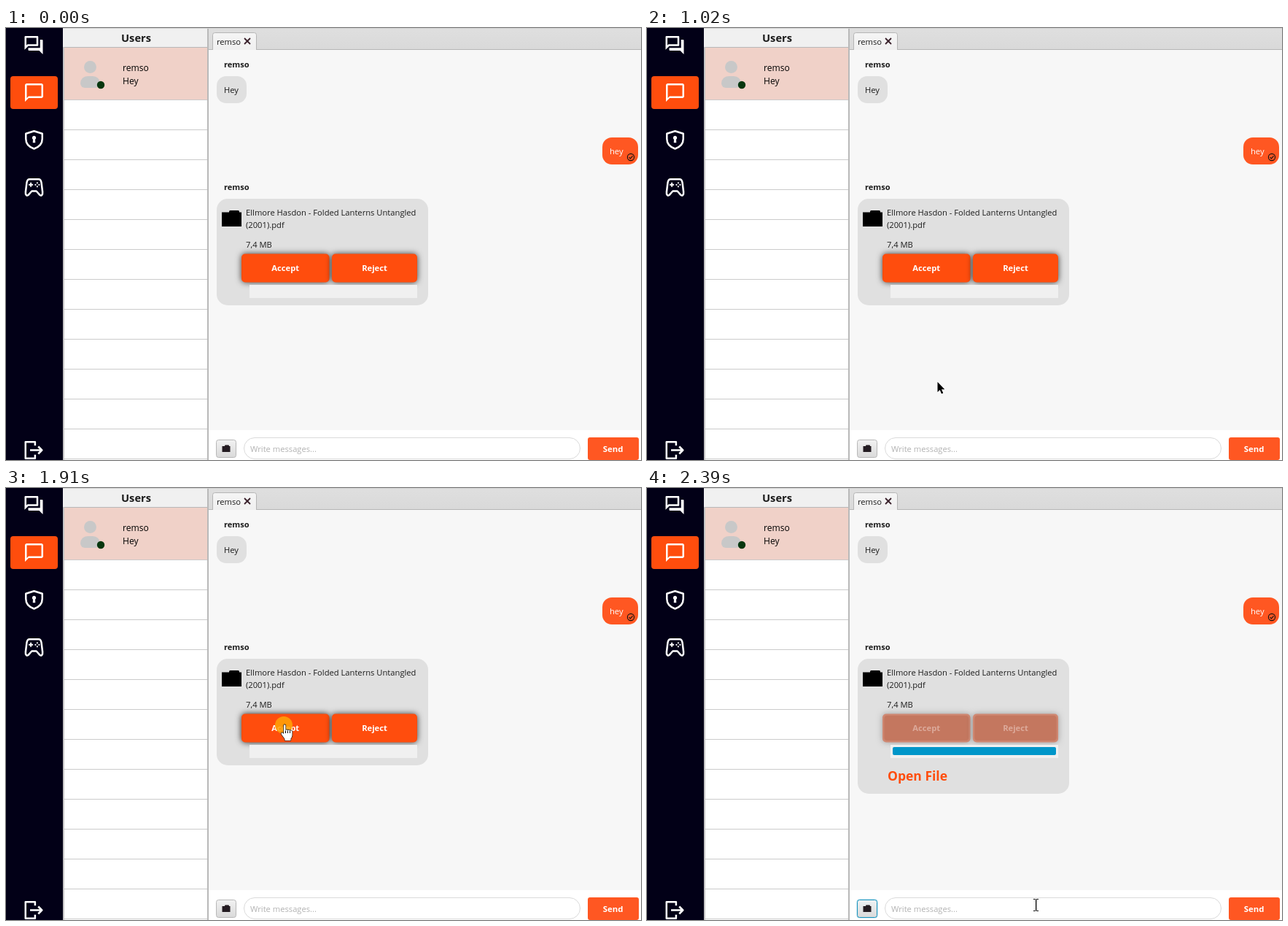
An HTML page with a canvas that plays this animation: 871x592 px, repeating every 2460 ms.

```html
<!DOCTYPE html>
<html lang="en">
<head>
<meta charset="utf-8">
<title>Chat file transfer</title>
<style>
html, body { margin: 0; width: 100%; height: 100%; overflow: hidden; background: #f7f7f7; }
canvas { display: block; width: 871px; height: 592px; }
</style>
</head>
<body>
<canvas id="stage" width="871" height="592"></canvas>
<script>
const ctx = document.getElementById('stage').getContext('2d');
const LOOP = 2460;
const ORANGE = '#ff4d0d', CORAL = '#ff5722', BUBBLE = '#e0e0e0', INK = '#1c1c1c';
const USER = 'remso';

// The screen refreshes only at these moments.
const TICKS = [0, 330, 400, 470, 600, 670, 740, 810, 880, 950, 1020, 1090, 1160, 1230, 1300, 1370,
  1440, 1510, 1590, 1670, 1750, 1830, 1910, 1980, 2050, 2120, 2190, 2270, 2320, 2390];

// Pointer way points: time, x, y
const PATH = [[330, 466, 579], [400, 420, 574], [470, 397, 570], [600, 397, 570], [740, 398, 563],
  [810, 398, 551], [880, 400, 531], [1020, 398, 485], [1160, 392, 429], [1300, 381, 371],
  [1370, 379, 355], [1440, 378, 348], [1590, 379, 336], [1750, 382, 326], [1910, 382, 325],
  [1980, 384, 330], [2050, 410, 380], [2120, 462, 468], [2190, 508, 535], [2270, 529, 566], [2390, 533, 571]];

const ICONS = {
  forum: new Path2D('M15 4v7H5.17L4 12.17V4h11m1-2H3c-.55 0-1 .45-1 1v14l4-4h10c.55 0 1-.45 1-1V3c0-.55-.45-1-1-1zm5 4h-2v9H6v2c0 .55.45 1 1 1h11l4 4V7c0-.55-.45-1-1-1z'),
  chat: new Path2D('M20 2H4c-1.1 0-2 .9-2 2v18l4-4h14c1.1 0 2-.9 2-2V4c0-1.1-.9-2-2-2zm0 14H6l-2 2V4h16v12z'),
  shield: new Path2D('M12 2.6L21 5.4V11c0 5.200-3.600 9.200-9 11C6.600 20.200 3 16.200 3 11V5.400z'),
  keyhole: new Path2D('M12 7.800a2.200 2.200 0 0 1 1.200 4L13.400 15.400H10.600L10.800 11.800A2.200 2.200 0 0 1 12 7.800z'),
  pad: new Path2D('M7 3H17C19 3 19.600 4.500 20 6.500L21.300 17C21.700 20.500 19.800 21.500 18.300 20.300L14.500 16H9.500L5.700 20.300C4.200 21.500 2.300 20.500 2.700 17L4 6.500C4.400 4.500 5 3 7 3z'),
  cross: new Path2D('M8.500 6.600V11.400M6.100 9H10.900'),
  exit: new Path2D('M13.500 7V3H3V21H13.500V17M8 12H21M17 8L21 12L17 16'),
  arrow: new Path2D('M.5 0V14L3.700 11L6 16.200L8.300 15.200L6 10.200H10.300z'),
  hand: new Path2D('M-1 9V0Q0-1.600 1.500 0V7Q3 5.300 4.500 7Q6 5.700 7.500 7.500Q9 6.500 10.500 8.500V14Q10 17 8.500 18.500V21H.5V19L-4.500 12Q-4.500 9.500-2.500 10.500L-1 12z')
};

function rect(x, y, w, h, color) {
  ctx.fillStyle = color;
  ctx.fillRect(x, y, w, h);
}

function round(x, y, w, h, r, fill, stroke) {
  ctx.beginPath();
  ctx.roundRect(x, y, w, h, r);
  if (fill) { ctx.fillStyle = fill; ctx.fill(); }
  if (stroke) { ctx.strokeStyle = stroke; ctx.lineWidth = 1; ctx.stroke(); }
}

function disc(x, y, r, color) {
  ctx.beginPath();
  ctx.arc(x, y, r, 0, 7);
  ctx.fillStyle = color;
  ctx.fill();
}

function text(str, x, y, size, color = INK, weight = 400, align = 'left') {
  ctx.font = `${weight} ${size}px "Open Sans", "Noto Sans", sans-serif`;
  ctx.textAlign = align;
  ctx.fillStyle = color;
  ctx.fillText(str, x, y);
}

function line(points, width, color) {
  ctx.beginPath();
  points.forEach(([x, y]) => ctx.lineTo(x, y));
  ctx.lineWidth = width;
  ctx.strokeStyle = color;
  ctx.stroke();
}

function vertical(y0, y1, a, b) {
  const g = ctx.createLinearGradient(0, y0, 0, y1);
  g.addColorStop(0, a);
  g.addColorStop(1, b);
  return g;
}

function at(x, y, scale, draw) {
  ctx.save();
  ctx.translate(x, y);
  ctx.scale(scale, scale);
  ctx.fillStyle = ctx.strokeStyle = '#fff';
  ctx.lineJoin = 'round';
  ctx.lineWidth = 2;
  draw();
  ctx.restore();
}

function sidebar() {
  rect(0, 0, 78, 592, '#020017');
  round(6, 66, 65, 45, 4, ORANGE);
  at(23, 8.5, 1.25, () => ctx.fill(ICONS.forum));
  at(23.500, 73.500, 1.25, () => ctx.fill(ICONS.chat));
  at(23.500, 138, 1.25, () => {
    ctx.stroke(ICONS.shield);
    ctx.fill(ICONS.keyhole);
  });
  at(23.500, 203.500, 1.25, () => {
    ctx.stroke(ICONS.pad);
    ctx.lineWidth = 1.5;
    ctx.stroke(ICONS.cross);
    for (const [x, y] of [[15.5, 7], [15.5, 11], [13.5, 9], [17.5, 9]]) disc(x, y, 0.9, '#fff');
  });
  at(23, 563.500, 1.25, () => ctx.stroke(ICONS.exit));
}

function userList() {
  rect(78, 0, 200, 592, '#fff');
  rect(78, 0, 199, 26, '#f0f0f0');
  text('Users', 178.5, 19, 14.7, INK, 700, 'center');
  rect(78, 26, 200, 1, '#b8b8b8');
  rect(80, 27, 196, 71, '#f0d1c8');
  for (let y = 98; y < 592; y += 41) rect(80, y, 196, 1, '#cbcbcb');
  rect(78, 26, 2, 566, '#c4c4c4');
  rect(276, 0, 2, 592, '#b9b9b9');
  disc(115.500, 53.500, 8.5, '#c8c8c8');
  round(102, 66, 27, 16, [11, 11, 7, 7], '#c8c8c8');
  disc(130, 78, 5.2, '#06370f');
  text(USER, 160, 59, 12.1, '#000');
  text('Hey', 160, 77, 12.1, '#000');
}

function tabs() {
  rect(278, 0, 593, 30, vertical(0, 30, '#dfdfdf', '#d9d9d9'));
  rect(278, 29, 593, 1, '#b5b5b5');
  round(283.500, 6.500, 60, 26, [3, 3, 0, 0], vertical(6, 30, '#f5f5f5', '#f0f0f0'), '#b5b5b5');
  rect(278, 30, 593, 521, '#f7f7f7');
  text(USER, 289, 23, 11.2);
  line([[327, 14], [335, 22]], 1.8, '#38202a');
  line([[335, 14], [327, 22]], 1.8, '#38202a');
  rect(78, 0, 793, 1, '#d0d0d0');
}

function actionButton(label, x, w, off, hover) {
  ctx.save();
  ctx.shadowColor = off ? 'rgba(0,0,0,.3)' : hover ? 'rgba(0,0,0,.85)' : 'rgba(0,0,0,.75)';
  ctx.shadowBlur = off ? 8 : 9;
  round(x, 309.500, w, 39, 5, off ? '#d18a74' : ORANGE);
  ctx.restore();
  if (off) {
    ctx.save();
    ctx.shadowColor = '#c4775f';
    ctx.shadowBlur = 3;
    round(x + 2.5, 312, w - 5, 34, 4, '#c4775f');
    ctx.restore();
  }
  text(label, x + w / 2, 333, 11.2, off ? '#dcaa9b' : '#fff', 700, 'center');
}

function fileCard(s) {
  round(289, 234, 290, s.done ? 185 : 146, 15, BUBBLE);
  round(306, 250, 14, 5, 1.5, '#000');
  rect(296, 252.500, 27, 19.5, '#000');
  text('Ellmore Hasdon - Folded Lanterns Untangled', 329, 257, 11.2);
  text('(2001).pdf', 329, 274, 11.2);
  text('7,4 MB', 329, 301, 11.2);
  actionButton('Accept', 323, 120.500, s.off, s.hover);
  actionButton('Reject', 447, 117, s.off);
  rect(334, 352, 230, 18, '#f0f0f0');
  if (s.progress > 0) round(337, 355, 224 * s.progress, 11, 2, '#0096c9');
  if (s.done) text('Open File', 330, 401, 17.5, ORANGE, 700);
}

function messages(s) {
  text(USER, 299, 54, 11.1, INK, 700);
  round(289, 66, 41, 37, 13, BUBBLE);
  text('Hey', 299, 89, 11.2);
  round(818, 150, 49, 37, 13, CORAL);
  text('hey', 828, 173, 11.2, '#fff');
  ctx.beginPath();
  ctx.arc(857, 177, 4.6, 0, 7);
  ctx.lineWidth = 1.1;
  ctx.strokeStyle = '#111';
  ctx.stroke();
  line([[854.600, 177.200], [856.300, 178.900], [859.600, 175.300]], 1.1, '#111');
  text(USER, 299, 222, 11.1, INK, 700);
  fileCard(s);
}

function inputBar(focus) {
  rect(278, 551, 593, 41, '#fff');
  rect(276, 551, 2, 41, '#b9b9b9');
  if (focus) round(287.500, 563.500, 29, 26, 4, '#b5e0ef');
  round(288.500, 564.500, 27, 24, 3, vertical(564, 589, focus ? '#eef3f5' : '#f2f2f2', '#d9d9d9'), focus ? '#1793bd' : '#b8b8b8');
  round(300, 571.500, 6, 3, 1, '#241c22');
  rect(296.500, 573, 11, 8, '#241c22');
  round(326.500, 561.500, 461, 29, 14.5, '#fff', '#dadada');
  text('Write messages...', 335, 581, 11.2, '#b2b2b2');
  round(798, 561, 70, 31, 3, CORAL);
  text('Send', 832.500, 581, 11.4, '#fff', 700, 'center');
}

function pointerAt(t) {
  const i = PATH.findIndex(p => p[0] >= t);
  const [t1, x1, y1] = PATH[i];
  const [t0, x0, y0] = PATH[Math.max(i - 1, 0)];
  const k = t1 > t0 ? (t - t0) / (t1 - t0) : 1;
  return { x: Math.round(x0 + (x1 - x0) * k), y: Math.round(y0 + (y1 - y0) * k) };
}

function pointer({ x, y }, hover, press) {
  if (press) disc(x - 1, y, 12, 'rgba(255,164,8,.85)');
  if (y > 558) {
    rect(x, y - 7, 1.3, 15, '#000');
    for (const dy of [-8, 8]) {
      rect(x - 3, y + dy, 3, 1, '#000');
      rect(x + 1, y + dy, 3, 1, '#000');
    }
    return;
  }
  at(x, y, 1, () => {
    const shape = hover ? ICONS.hand : ICONS.arrow;
    ctx.lineWidth = hover ? 1.2 : 1.4;
    ctx.strokeStyle = hover ? '#000' : '#fff';
    ctx.fillStyle = hover ? '#fff' : '#000';
    ctx.stroke(shape);
    ctx.fill(shape);
    if (hover) {
      ctx.beginPath();
      for (const px of [1.5, 4.5, 7.5]) { ctx.moveTo(px, 7.500); ctx.lineTo(px, 11); }
      ctx.lineWidth = 1;
      ctx.stroke();
    }
  });
}

function draw(now) {
  const clock = now % LOOP;
  const t = TICKS.filter(v => v <= clock + 0.01).pop();
  const shown = t >= 330;
  const pos = shown && pointerAt(t);
  const off = t >= 1980;
  const hover = shown && !off && pos.y > 309 && pos.y < 347;
  const progress = off ? Math.min(1, 0.857 + (t - 2190) / 280) : 0;

  sidebar();
  userList();
  tabs();
  messages({ off, hover, progress, done: t >= 2270 });
  inputBar(off);
  if (shown) pointer(pos, hover, t >= 1830 && !off);
}

const start = performance.now();
function loop() {
  draw(performance.now() - start);
  requestAnimationFrame(loop);
}
loop();
</script>
</body>
</html>
```
